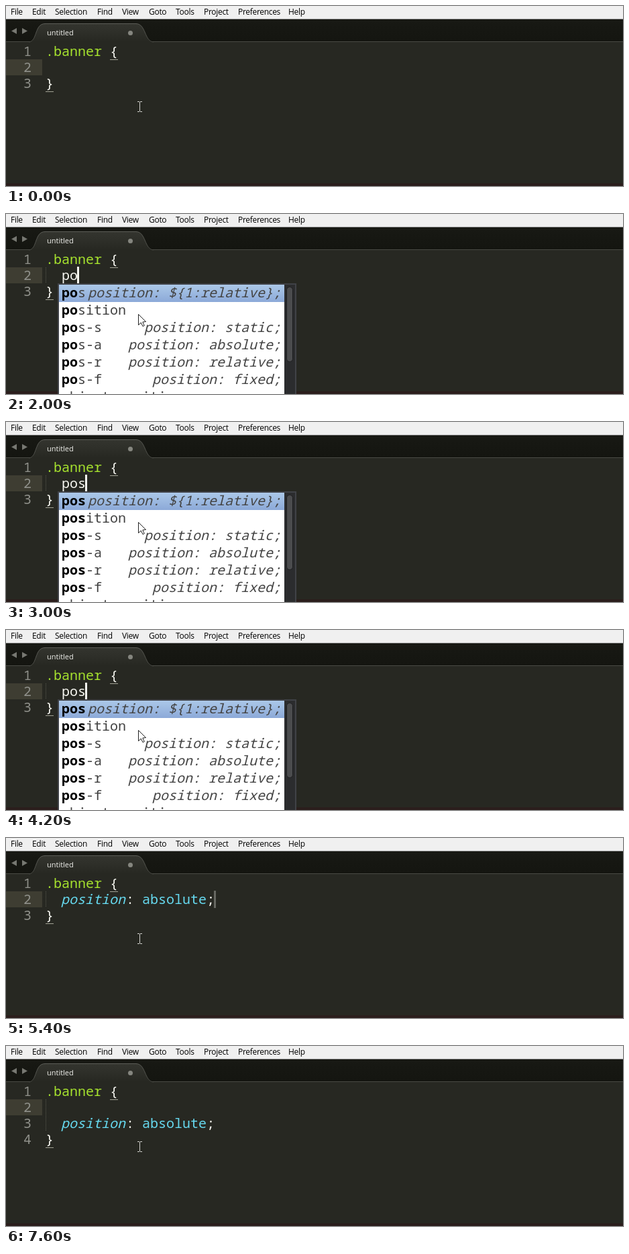
Write an HTML page with a canvas that moves like this. It is 920 by 270 pixels and loops after 8 s.

```html
<!DOCTYPE html>
<html lang="en">
<head>
<meta charset="utf-8">
<title>Editor completion</title>
<style>
  html, body { margin: 0; width: 100%; height: 100%; overflow: hidden; background: #272822; }
  canvas { display: block; width: 920px; height: 270px; }
</style>
</head>
<body>
<canvas id="stage" width="920" height="270"></canvas>
<script>
const ctx = document.getElementById('stage').getContext('2d');
const W = 920, H = 270, LOOP = 8000;
const CELL = 12, LINE = 24, ROW = 26;
const FACE = '20px "Noto Sans Mono", "DejaVu Sans Mono", monospace';
const MONO = '500 ' + FACE, BOLD = 'bold ' + FACE, ITALIC = 'italic ' + MONO;
const UI = '"Open Sans", "Noto Sans", sans-serif';
const WHITE = '#f8f8f2', CYAN = '#66d9ef', GREEN = '#a6e22e';

const MENU = [['File', 7], ['Edit', 39], ['Selection', 73], ['Find', 136], ['View', 173],
  ['Goto', 213], ['Tools', 253], ['Project', 295], ['Preferences', 346], ['Help', 421]];

const VALUES = { s: 'static', a: 'absolute', r: 'relative', f: 'fixed' };
const KINDS = Object.keys(VALUES).map(k => ['pos-' + k, `position: ${VALUES[k]};`]);
const LONG = {
  width: 356, scroll: true,
  rows: [['pos', 'position: ${1:relative};'], ['position'], ...KINDS, ['object-position']]
};
const POPUPS = {
  p: LONG, po: LONG, pos: LONG,
  poa: { width: 304, rows: [KINDS[1], ['padding-top'], ['padding-bottom'], ['page-break-before']] },
  'pos-': { width: 304, rows: KINDS },
  'pos-a': { width: 304, rows: [KINDS[1]] }
};

// [start time, typed text, caret opacity]
const DONE = 'position: absolute;', INSERTED = '\n' + DONE;
const STEPS = [
  [0, '', 0], [400, '', .3], [600, '', 1], [800, '', .3], [1000, '', 0],
  [1400, '', .3], [1600, '', 1], [1800, 'p', 1], [2000, 'po', 1], [2200, 'poa', 1],
  [2400, 'poa', .3], [2600, 'poa', 0], [3000, 'pos', 1], [3400, 'pos', .3], [3600, 'pos', 0],
  [4200, 'pos', 1], [4400, 'pos-', 1], [4600, 'pos-a', 1], [5000, 'pos-a', .3],
  [5200, DONE, 1], [5400, DONE, .3], [5600, DONE, 0], [6200, DONE, .3], [6400, DONE, 1],
  [6600, DONE, .27], [6800, DONE, 0], [7000, INSERTED, 1], [7200, INSERTED, .7],
  [7400, INSERTED, .3], [7600, INSERTED, 0]
];

function rect(x, y, w, h, color) {
  ctx.fillStyle = color;
  ctx.fillRect(x, y, w, h);
}

function text(s, x, y, color, font = MONO) {
  ctx.font = font;
  ctx.fillStyle = color;
  ctx.fillText(s, x, y);
}

function shade(y0, y1, top, bottom) {
  const g = ctx.createLinearGradient(0, y0, 0, y1);
  g.addColorStop(0, top);
  g.addColorStop(1, bottom);
  return g;
}

function poly(points, fill) {
  ctx.beginPath();
  points.forEach(([x, y]) => ctx.lineTo(x, y));
  ctx.closePath();
  ctx.fillStyle = fill;
  ctx.fill();
}

const baseline = line => 75 + (line - 1) * LINE;

function drawTab() {
  ctx.beginPath();
  ctx.moveTo(34, 54);
  ctx.bezierCurveTo(47, 53, 42, 27, 58, 26.5);
  ctx.lineTo(194, 26.5);
  ctx.bezierCurveTo(209, 27, 206, 53, 220, 54);
  ctx.fillStyle = shade(26, 54, '#34352f', '#272822');
  ctx.fill();
  ctx.strokeStyle = shade(26, 54, '#5c5d57', '#4a4b45');
  ctx.lineWidth = 1;
  ctx.stroke();
  text('untitled', 61, 44, '#f2f2ee', '11px ' + UI);
  ctx.beginPath();
  ctx.arc(185.5, 40.5, 3.5, 0, Math.PI * 2);
  ctx.fillStyle = '#85867f';
  ctx.fill();
}

function drawMenu() {
  rect(0, 0, W, 19, '#f0f0f0');
  rect(0, 19, W, 1, '#a0a0a0');
  ctx.letterSpacing = '-0.3px';
  MENU.forEach(([name, x]) => text(name, x, 13, '#000', '12px ' + UI));
  ctx.letterSpacing = '0px';
}

function drawWindow() {
  rect(0, 0, W, H, '#272822');
  rect(0, 19, W, 35, shade(19, 54, '#181914', '#141510'));
  rect(0, 53, W, 1, '#4a4b45');
  drawMenu();
  poly([[16, 33], [16, 42], [8, 37.5]], '#777872');
  poly([[24, 33], [24, 42], [32, 37.5]], '#777872');
  drawTab();
  rect(0, 266, W, 4, '#2b1e1c');
}

function brace(ch, x, line) {
  text(ch, x, baseline(line), WHITE);
  rect(x, baseline(line) + 5, CELL, 1, '#a3a396');
}

function drawCode(typed, caret) {
  const lines = typed.split('\n');
  const last = lines.length + 2;
  rect(0, 80, 54, LINE, '#3e3d32');
  for (let n = 1; n <= last; n++) text(n, 26, baseline(n), '#8f908a');
  text('.banner', 59, baseline(1), GREEN);
  brace('{', 155, 1);
  brace('}', 59, last);

  if (typed) {
    for (let y = 80; y < 80 + lines.length * LINE; y += 2) rect(59, y, 1, 1, '#55564d');
  }
  lines.forEach((s, i) => {
    const y = baseline(i + 2);
    if (s === DONE) {
      text('position', 82, y, CYAN, ITALIC);
      text(':', 83 + 8 * CELL, y, WHITE);
      text('absolute', 83 + 10 * CELL, y, CYAN);
      text(';', 83 + 18 * CELL, y, WHITE);
    } else {
      text(s, 83, y, WHITE);
    }
  });
  ctx.globalAlpha = caret;
  rect(82 + lines[0].length * CELL, 79, 3, 26, '#f8f8f0');
  ctx.globalAlpha = 1;
}

// Contiguous match first, otherwise the first occurrence of each letter.
function matches(label, typed) {
  const at = label.indexOf(typed);
  return [...typed].map((c, i) => at < 0 ? label.indexOf(c) : at + i);
}

function drawPopup({ width, rows, scroll }, typed) {
  const height = rows.length * ROW + 4;
  const inner = width - (scroll ? 18 : 4);
  rect(77, 104, width, height, '#404247');
  rect(79, 106, inner, height - 4, '#fff');
  rect(79, 106, inner, ROW, shade(106, 132, '#abc8e8', '#8ca9d8'));
  rows.forEach(([label, hint], r) => {
    const y = 125 + r * ROW;
    const bold = matches(label, typed);
    [...label].forEach((c, i) => {
      const hit = bold.includes(i);
      text(c, 83 + i * CELL, y, hit ? '#000' : '#414141', hit ? BOLD : MONO);
    });
    if (hint) text(hint, 72 + inner + (scroll ? 0 : 2) - hint.length * CELL, y, '#444', ITALIC);
  });
  if (scroll) {
    rect(415, 106, 16, H - 106, '#2b2c2e');
    ctx.beginPath();
    ctx.roundRect(418.5, 109.5, 9, 112, 4);
    ctx.fillStyle = '#4b4c4e';
    ctx.fill();
    ctx.strokeStyle = '#1c1d1f';
    ctx.lineWidth = 1;
    ctx.stroke();
  }
}

function drawPointer(arrow) {
  if (arrow) {
    poly([[197.5, 150.5], [197.5, 166.5], [201.3, 163], [204, 168.5], [206.3, 167.4],
      [203.8, 162], [208.5, 161.5]], '#fff');
    ctx.strokeStyle = '#222';
    ctx.lineWidth = 1;
    ctx.stroke();
  } else {
    const color = '#d4d4d0';
    rect(199, 144, 1, 14, color);
    for (const y of [143, 158]) {
      rect(196, y, 3, 1, color);
      rect(200, y, 3, 1, color);
    }
  }
}

function frame(now) {
  const t = now % LOOP;
  const [, typed, caret] = STEPS.findLast(s => s[0] <= t);
  const popup = POPUPS[typed];
  drawWindow();
  drawCode(typed, caret);
  if (popup) drawPopup(popup, typed);
  drawPointer(popup && popup.rows.length > 1);
  requestAnimationFrame(frame);
}

requestAnimationFrame(frame);
</script>
</body>
</html>
```
